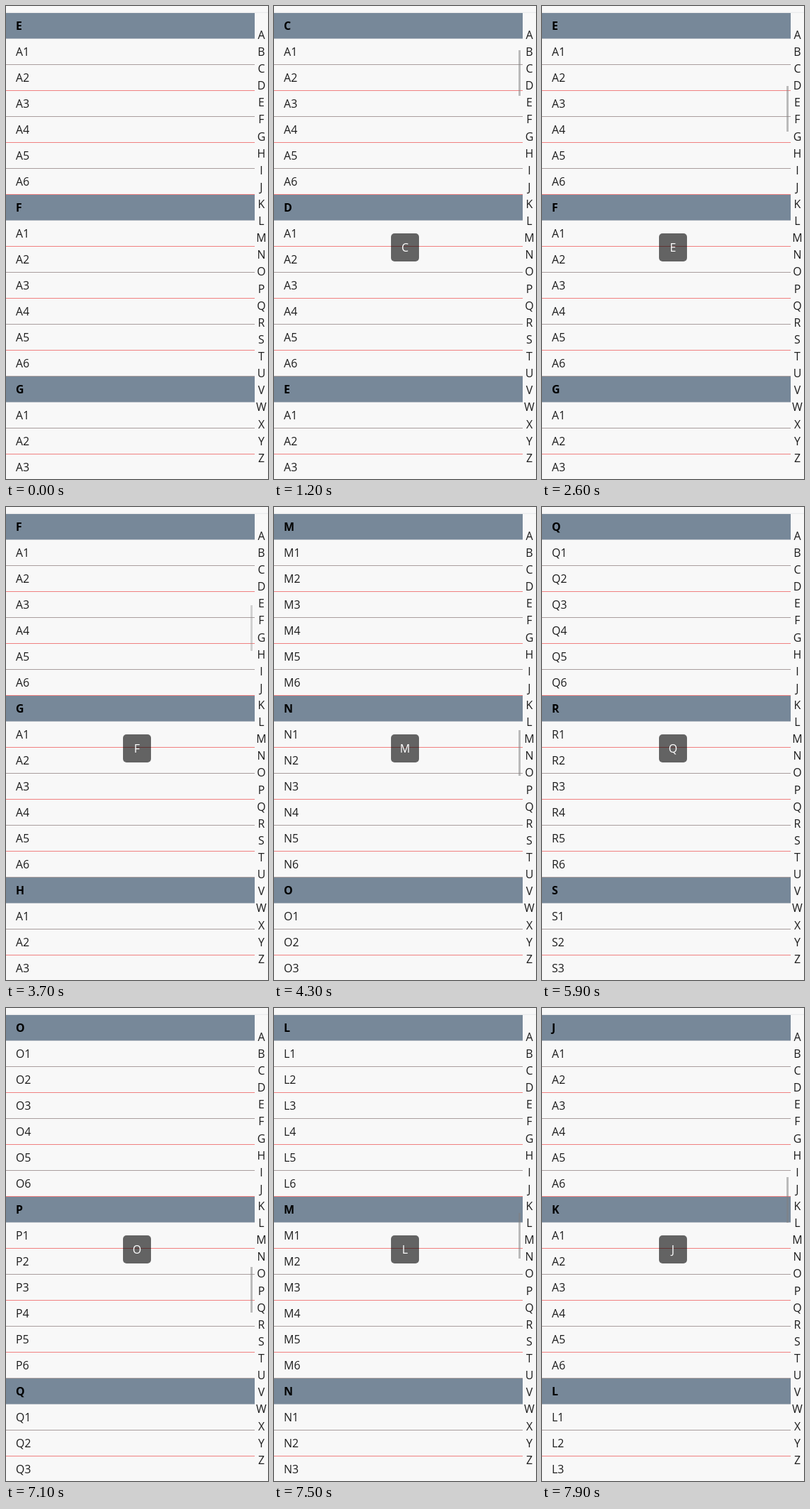
Animation of 374x674 px, one loop 8 s. Source, as an HTML page with a canvas:

```html
<!DOCTYPE html>
<html lang="en">
<head>
<meta charset="utf-8">
<title>Index list</title>
<style>
  html, body { margin: 0; width: 100%; height: 100%; overflow: hidden; background: #f8f8f8; }
  canvas { display: block; width: 374px; height: 674px; }
</style>
</head>
<body>
<canvas id="stage" width="374" height="674"></canvas>
<script>
const ctx = document.getElementById('stage').getContext('2d');
const W = 374, H = 674, LOOP = 8000;
const LETTERS = 'ABCDEFGHIJKLMNOPQRSTUVWXYZ';
const FONT = '16px "Open Sans", "Noto Sans", sans-serif';
const TOP = 10, ROW = 37, ITEMS = 6, LIST_W = 355;

// at: start time, key: section at the top, fade: steps until the scrollbar is gone
const JUMPS = [
  { at: 0, key: 'E', fade: 0 },
  { at: 500, key: 'B', fade: 3 },
  { at: 1200, key: 'C', fade: 2, wait: 400 },
  { at: 1900, key: 'D', fade: 2, wait: 400 },
  { at: 2600, key: 'E', fade: 2, wait: 400 },
  { at: 3400, key: 'F', fade: 3 },
  { at: 4300, key: 'M', fade: 2, wait: 400 },
  { at: 5400, key: 'Q', fade: 2, wait: 400 },
  { at: 6200, key: 'P', fade: 2 },
  { at: 7100, key: 'O', fade: 2 },
  { at: 7200, key: 'N', fade: 2 },
  { at: 7300, key: 'M', fade: 2 },
  { at: 7500, key: 'L', fade: 2 },
  { at: 7700, key: 'K', fade: 2 },
  { at: 7900, key: 'J', fade: 2 }
];

function rect(x, y, w, h, color) {
  ctx.fillStyle = color;
  ctx.fillRect(x, y, w, h);
}

function text(str, x, y, color, align = 'left', bold = false) {
  ctx.font = (bold ? 'bold ' : '') + FONT;
  ctx.textAlign = align;
  ctx.fillStyle = color;
  ctx.fillText(str, x, y);
}

function drawList(first) {
  let y = TOP;
  for (let s = first; y < H && s < LETTERS.length; s++) {
    const key = LETTERS[s];
    rect(0, y, LIST_W, ROW - 1, '#778899');
    rect(0, y + ROW - 1, LIST_W, 1, '#b4bbc4');
    text(key, 14, y + 24, '#000', 'left', true);
    y += ROW;
    const label = key < 'L' ? 'A' : key;
    for (let i = 1; i <= ITEMS; i++, y += ROW) {
      const line = y + ROW - 1;
      rect(0, line, LIST_W, 1, line % 2 ? '#a89d9d' : '#f08080');
      text(label + i, 14, y + 24, '#1c1c1c');
    }
  }
}

function drawIndex() {
  [...LETTERS].forEach((c, i) => text(c, 364.5, Math.round(46.8 + i * 24.12), '#1c1c1c', 'center'));
}

function drawScrollbar(section, alpha) {
  if (alpha <= 0) return;
  const y = Math.round(38 + (section - 1) * 25.435);
  rect(349, y, 3, 65, `rgba(128,128,128,${alpha * 0.5})`);
}

function drawBadge(key) {
  ctx.fillStyle = 'rgba(0,0,0,0.6)';
  ctx.beginPath();
  ctx.roundRect(167, 324, 40, 40, 5);
  ctx.fill();
  text(key, 187, 350, '#fff', 'center');
}

function barAlpha(jump, age) {
  if (!jump.fade) return 0;
  const step = Math.floor((age - (jump.wait || 300)) / 100) + 1;
  return 1 - Math.min(Math.max(step, 0), jump.fade) / jump.fade;
}

function draw(t) {
  const jump = JUMPS.filter(j => j.at <= t).pop();
  const section = LETTERS.indexOf(jump.key);
  rect(0, 0, W, H, '#f8f8f8');
  rect(0, 8, W, 1, '#f4f4f5');
  rect(0, 9, W, 1, '#eaebec');
  drawList(section);
  drawIndex();
  drawScrollbar(section, barAlpha(jump, t - jump.at));
  const released = t >= 5200 && t < 5400;
  if (t >= 500 && !released) drawBadge(jump.key);
}

const start = performance.now();
function tick() {
  draw((performance.now() - start) % LOOP);
  requestAnimationFrame(tick);
}
tick();
</script>
</body>
</html>
```
